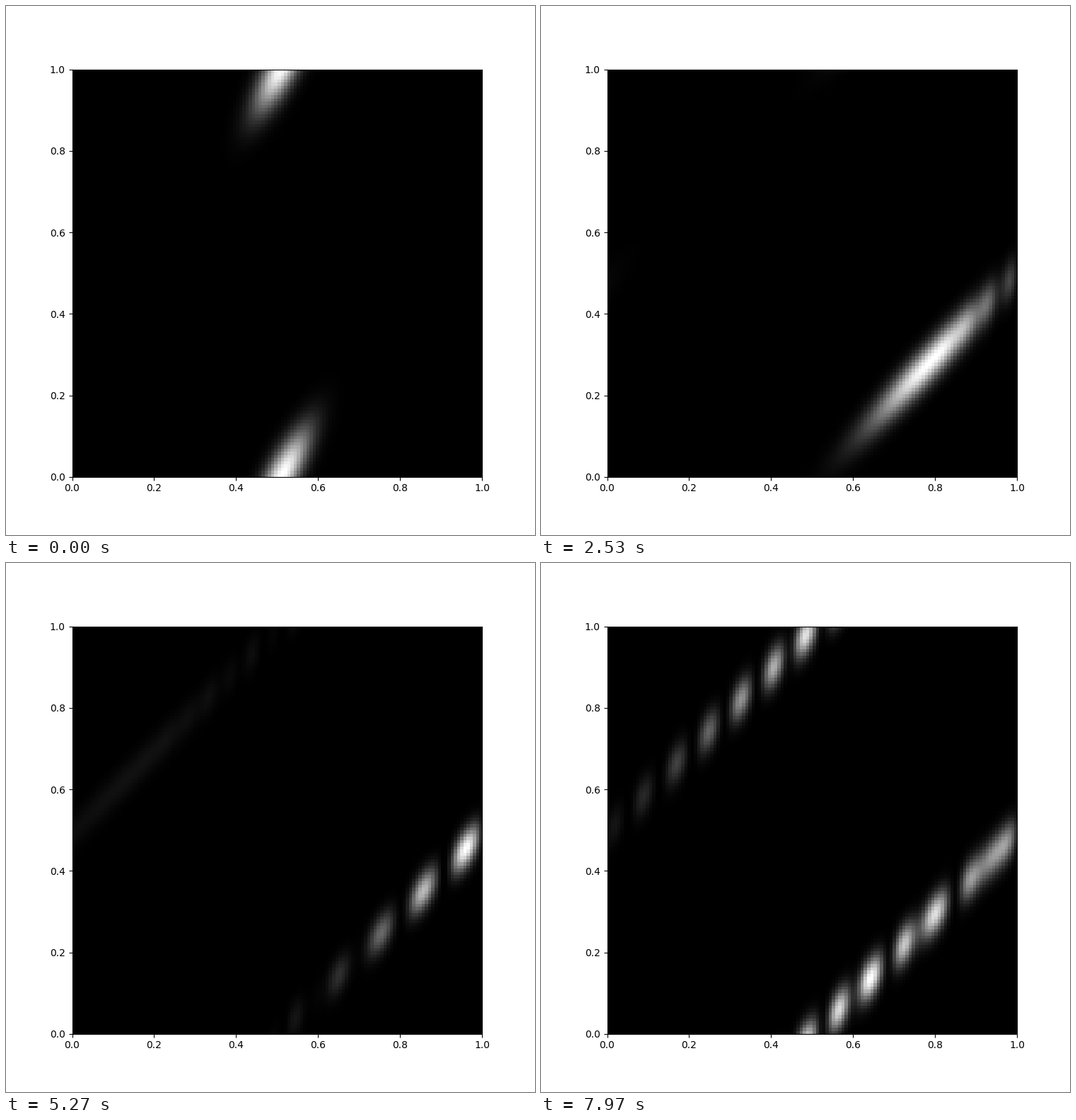
These frames come from a looping animation (748 by 748 pixels, 8 s). A matplotlib script:

```python
import numpy as np
import matplotlib.pyplot as plt
from matplotlib.animation import FuncAnimation

FRAMES, STEP_MS = 250, 32
N = 128
DX = 1 / N
MASS = 310        # heavy particle x, with hbar = 1
SPEED = 0.11
START, WIDTH = 0.512, 0.045
BARRIER = 0.22    # area of the thin barrier at x = 0
BREATH = 0.95     # breathing period of the light particle y, in s

x = (np.arange(N) + 0.5) * DX
X, Y = np.meshgrid(x, x)

# Heavy particle on a ring with a barrier, solved by its eigenstates
eye = np.eye(N)
H = (2 * eye - np.roll(eye, 1, 0) - np.roll(eye, -1, 0)) / (2 * MASS * DX**2)
H[0, 0] += BARRIER / DX
energy, states = np.linalg.eigh(H)
packet = np.exp(-((x - START) / (2 * WIDTH))**2 + 1j * MASS * SPEED * x)
coeffs = states.T @ packet


def density(t):
    heavy = np.abs(states @ (coeffs * np.exp(-1j * energy * t)))**2

    # Light particle: a breathing packet bound half a turn away from x
    sigma = 0.038 + 0.008 * np.cos(2 * np.pi * t / BREATH)
    lean = 0.3 * np.exp(-t) * (X - START - SPEED * t)
    d = (Y - X - lean + 0.004) % 1 - 0.5
    rho = heavy * np.exp(-(d / sigma)**2 / 2)
    return rho / rho.max()


fig, ax = plt.subplots(figsize=(7.48, 7.48), dpi=100)
image = ax.imshow(density(0), origin="lower", extent=(0, 1, 0, 1),
                  aspect="auto", cmap="gray", vmin=0, vmax=1,
                  interpolation="nearest")


def update(i):
    image.set_data(density(i * STEP_MS / 1000))
    return [image]


anim = FuncAnimation(fig, update, frames=FRAMES, interval=STEP_MS,
                     repeat=True, repeat_delay=0)
plt.show()
```
